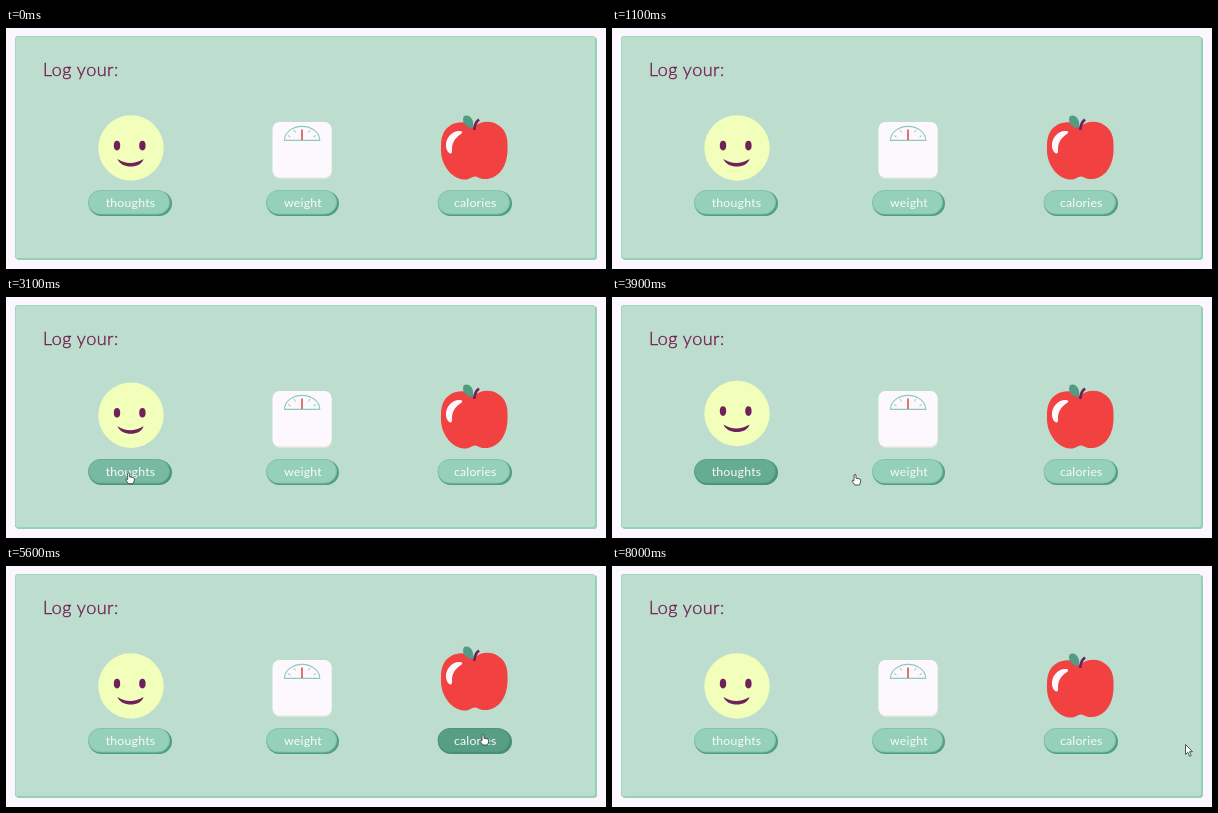
An HTML page that plays this animation: 600 by 241 pixels, repeating every 8.1 s.

```html
<!DOCTYPE html>
<html lang="en">
<head>
<meta charset="utf-8">
<title>Log your</title>
<style>
  html, body { margin: 0; width: 100%; height: 100%; overflow: hidden; background: #fcf7fe; }
  svg { display: block; width: 600px; height: 241px; }
  text { font-family: Lato, "Open Sans", sans-serif; }
  .title { font-size: 18px; font-weight: 300; letter-spacing: .5px; fill: #74204f; stroke: #74204f; stroke-width: .4px; }
  .label { font-size: 12.3px; letter-spacing: .2px; text-anchor: middle; fill: #fdf8fe; }
</style>
</head>
<body>
<svg viewBox="0 0 600 241">
  <rect x="10" y="9" width="581" height="223" rx="3" fill="#93d2b7"/>
  <rect x="9" y="8" width="580" height="222" rx="3" fill="#bddecf"/>
  <path d="M9.5 230V11q0-2.5 2.5-2.5H588" fill="none" stroke="#9fd6be"/>
  <text class="title" x="37" y="48">Log your:</text>

  <g class="icon">
    <circle cx="125" cy="120" r="32.7" fill="#f1ffba"/>
    <g fill="#70205a">
      <ellipse cx="111" cy="117.6" rx="3.2" ry="4.8"/>
      <ellipse cx="136.4" cy="117.6" rx="3.2" ry="4.8"/>
      <path d="M111.5 131Q124 139 137.500 131C135 141 115 141 111.500 131Z"/>
    </g>
  </g>

  <g class="icon">
    <rect x="267" y="95" width="59" height="56" rx="7" fill="#dfe5d8"/>
    <rect x="266.5" y="94" width="59" height="55.5" rx="7" fill="#fdf8fe"/>
    <g fill="none" stroke="#8accb9" stroke-width="1.2">
      <path d="M278.5 112.3A17.6 14 0 0 1 313.7 112.3Z"/>
      <path d="M282 107.500l2.500 1.500M288 102l1.500 2.500M304 102l-1.500 2.500M310 107.500l-2.500 1.500" stroke-width="1"/>
    </g>
    <path d="M296 101.5V112" stroke="#d6524c" stroke-width="1.6"/>
  </g>

  <g class="icon">
    <path d="M468 99C474 93 485 92 492 97C499 101 502 109 501.500 118C502 127 500 137 495 143C490 149 484 151.500 478 151C473 151 472 148.500 469 148.500C465 148.500 464 152 458 151.500C451 151 445 147 441 141C436 134 434.500 126 435 118C435 108 438 101 445 97C452 93 462 93 468 99Z" fill="#f14141"/>
    <path d="M456 103.500C448 101 439 109 440 119Q441 124 444 125.500Q446.500 126 446 121C446 114 450 109 455 106Q457 104.500 456 103.500Z" fill="#fdf8fe"/>
    <path d="M458 88C464 85.500 468.500 92 467 100C459 100 455 93 458 88Z" fill="#519c82"/>
    <path d="M468.300 102Q468.500 95 473 91.500" fill="none" stroke="#70205a" stroke-width="2.700"/>
  </g>

  <g id="buttons"></g>

  <g id="cursor" fill="#fff" stroke="#3c4743" stroke-width=".9" stroke-linejoin="round">
    <path id="arrow" d="M.5 .5V10.500L2.800 8.300L4.500 12.300L6.200 11.500L4.500 7.700H7.500Z"/>
    <path id="hand" d="M-1 5V1Q0-.5 1 1V4.200L5 5Q6 5.500 5.600 8L4.500 11H-.2L-3 7.200Q-3 5.500-1 6.800Z"/>
  </g>
</svg>
<script>
const LOOP = 8100, STEP = 100, LIFT = 7, FADE = 300;
const items = [
  { label: "thoughts", x: 82, width: 82, enter: 3000, leave: 3750 },
  { label: "weight", x: 260, width: 71, enter: 3900, leave: 4750 },
  { label: "calories", x: 431.5, width: 72.5, enter: 5000, leave: 6920 }
];
// time, x, y of the pointer tip
const path = [
  [2500, 58, 242], [3000, 120, 176], [3300, 128, 175], [3600, 128, 175],
  [3900, 243, 177], [4100, 332, 180], [4700, 332, 180], [5100, 470, 169],
  [5500, 477, 168], [6700, 477, 168], [7000, 555, 178], [7200, 572, 178], [8000, 573, 178]
];
const handTimes = [[3100, 4000], [4300, 4900], [5200, 6900]];

const byId = id => document.getElementById(id);
const ease = p => { p = Math.min(1, Math.max(0, p)); return p * p * (3 - 2 * p); };
const mix = (a, b, p) => `rgb(${a.map((v, i) => Math.round(v + (b[i] - v) * p))})`;

byId("buttons").innerHTML = items.map(({ label, x, width }) => `
  <rect class="edge" x="${x + .5}" y="163" width="${width + 1.5}" height="25" rx="12.5"/>
  <rect class="face" x="${x + .5}" y="162.5" width="${width - 1}" height="23.5" rx="11.75"/>
  <text class="label" x="${x + width / 2 + 1.5}" y="178.500">${label}</text>`).join("");

const all = selector => [...document.querySelectorAll(selector)];
const icons = all(".icon"), edges = all(".edge"), faces = all(".face");

function pointerAt(t) {
  const i = path.findIndex(point => point[0] >= t);
  const b = path[Math.max(i, 0)], a = path[Math.max(i - 1, 0)];
  const p = b === a ? 0 : (t - a[0]) / (b[0] - a[0]);
  return [a[1] + (b[1] - a[1]) * p, a[2] + (b[2] - a[2]) * p];
}

function draw(t) {
  items.forEach(({ enter, leave }, i) => {
    const hover = ease((t - enter) / FADE) - ease((t - leave) / FADE);
    const shade = hover * (2 - hover);
    icons[i].setAttribute("transform", `translate(0 ${-LIFT * hover})`);
    faces[i].setAttribute("fill", mix([148, 209, 184], [86, 159, 132], shade));
    faces[i].setAttribute("stroke", mix([130, 196, 169], [78, 148, 122], shade));
    edges[i].setAttribute("fill", mix([82, 158, 130], [73, 141, 115], shade));
  });
  const hand = handTimes.some(([from, to]) => t >= from && t < to);
  byId("cursor").setAttribute("visibility", t >= path[0][0] ? "visible" : "hidden");
  byId("cursor").setAttribute("transform", `translate(${pointerAt(t)})`);
  byId("hand").style.display = hand ? "" : "none";
  byId("arrow").style.display = hand ? "none" : "";
}

const start = performance.now();
function tick() {
  const t = (performance.now() - start) % LOOP;
  draw(Math.floor(t / STEP) * STEP);
  requestAnimationFrame(tick);
}
tick();
</script>
</body>
</html>
```
